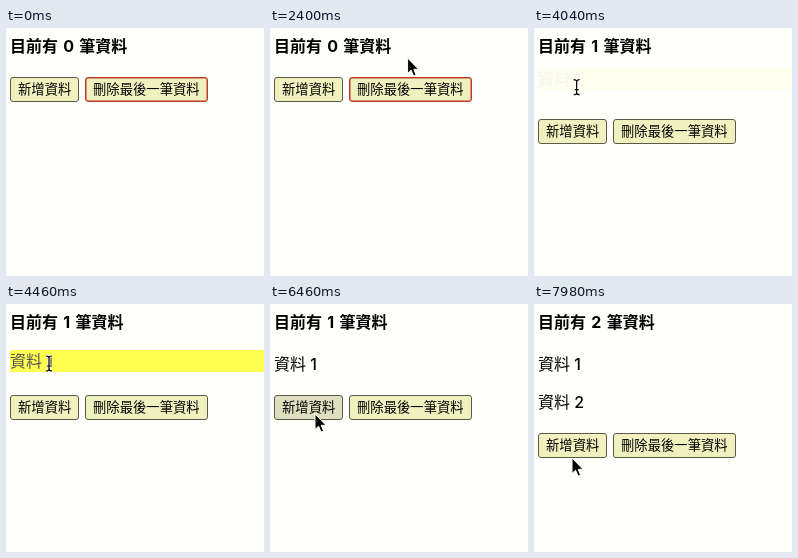
Recreate the animation shown at these times as an HTML page. Size 258 by 248 pixels, loop 8000 ms.

```html
<!DOCTYPE html>
<html lang="zh-Hant">
<meta charset="utf-8">
<style>
  html, body { margin: 0; width: 100%; height: 100%; overflow: hidden; background: #fffffb; }
  body { font: 500 16px/22px Inter, "Noto Sans CJK TC", "Noto Sans CJK", sans-serif; color: #000; }
  body > * { position: absolute; white-space: pre; }
  h1 { margin: 0; left: 4px; top: 7px; font-size: 16px; word-spacing: 1.5px; }
  .item { left: 4px; right: 0; height: 22px; }
  .btn {
    box-sizing: border-box; height: 25px; padding: 0 7px; line-height: 23px;
    font-size: 13.333px; border: 1px solid #5a5a48; border-radius: 3px; background: #f1f1c0;
  }
  .hover { background: #dfdfc0; }
  .empty { border-color: #c0392b; box-shadow: inset 0 0 0 .5px #c0392b; }
  svg { left: 0; top: 0; overflow: visible; }
</style>
<h1></h1>
<div class="item">資料 1</div>
<div class="item">資料 2</div>
<div class="btn" id="add" style="left:4px">新增資料</div>
<div class="btn" id="del" style="left:79px">刪除最後一筆資料</div>
<svg width="12" height="20">
  <path id="arrow" d="M0 0V15.5L3.6 12.2 6 18 8.6 17 6.2 11.3H11Z" fill="#000" stroke="#fff"/>
  <g id="beam" fill="none">
    <path id="bar" d="M-3-7Q0-7 0-5Q0-7 3-7M0-5V6M-3 8Q0 8 0 6Q0 8 3 8M-2 3H2" stroke="#fff" stroke-width="2.4"/>
    <use href="#bar" style="stroke:#000"/>
    <path d="M-3-7Q0-7 0-5Q0-7 3-7M0-5V6M-3 8Q0 8 0 6Q0 8 3 8M-2 3H2" stroke="#000" stroke-width="1.2"/>
  </g>
</svg>
<script>
  const LOOP = 8000, FADE = 1250, SLIDE = 9;
  const clicks = [3970, 6530];
  // Pointer stops: time, x, y
  const path = [
    [1840, 258, 60], [2100, 205, 42], [2400, 138, 30], [2640, 38, 38], [2900, 42, 57], [3200, 42, 58],
    [4460, 43, 59], [4560, 43, 59], [4860, 45, 117], [5200, 45, 110],
    [6650, 45, 110], [6980, 47, 182], [7200, 47, 182], [7800, 38, 154], [LOOP, 38, 154]
  ];
  const $ = s => document.querySelector(s);
  const items = document.querySelectorAll('.item');
  const show = (el, on) => el.style.display = on ? '' : 'none';

  // CSS "ease": cubic-bezier(.25, .1, .25, 1)
  function ease(x) {
    const curve = (a, b, u) => 3 * a * u * (1 - u) ** 2 + 3 * b * u * u * (1 - u) + u ** 3;
    let lo = 0, hi = 1;
    for (let i = 0; i < 20; i++) {
      const mid = (lo + hi) / 2;
      curve(.25, .25, mid) < x ? lo = mid : hi = mid;
    }
    return curve(.1, 1, lo);
  }

  function pointer(t) {
    const i = path.findIndex(p => p[0] > t);
    if (i < 1) return null;
    const [t0, x0, y0] = path[i - 1], [t1, x1, y1] = path[i];
    const k = (t - t0) / (t1 - t0);
    return [x0 + (x1 - x0) * k, y0 + (y1 - y0) * k];
  }

  function draw(t) {
    const count = clicks.filter(c => t >= c).length;
    $('h1').textContent = `目前有 ${count} 筆資料`;

    items.forEach((el, i) => {
      const k = (t - clicks[i]) / FADE, p = ease(Math.max(0, Math.min(1, k)));
      show(el, k >= 0);
      el.style.top = 49 + 38 * i + 'px';
      el.style.opacity = p;
      el.style.transform = `translateY(${SLIDE * (p - 1)}px)`;
      el.style.background = k < 1 ? '#ff0' : 'none';
    });

    const top = count ? 53 + 38 * count : 49;
    $('#add').style.top = $('#del').style.top = top + 'px';
    $('#del').classList.toggle('empty', !count);

    const pos = pointer(t);
    show($('svg'), pos);
    const [x, y] = pos || [-99, -99];
    $('svg').style.transform = `translate(${x}px,${y}px)`;
    const overText = count > 0 && y < 71;
    show($('#beam'), overText);
    show($('#arrow'), !overText);
    $('#add').classList.toggle('hover', x >= 4 && x < 73 && y >= top && y < top + 25);
  }

  const start = performance.now();
  (function tick() {
    draw((performance.now() - start) % LOOP);
    requestAnimationFrame(tick);
  })();
</script>
</html>
```
